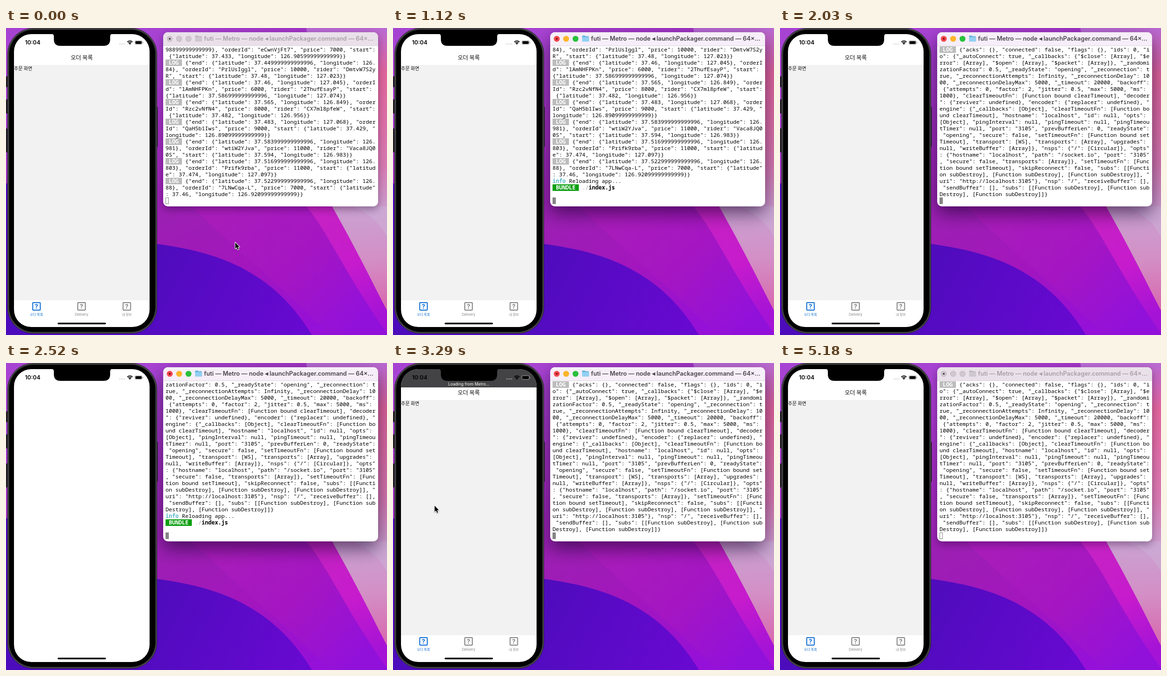
Animation, 812 px wide and 654 px high, one loop 5250 ms. Source, as an HTML page with a canvas:

```html
<!DOCTYPE html>
<html lang="ko">
<head>
<meta charset="utf-8">
<title>App reload</title>
<style>
html, body { margin: 0; width: 100%; height: 100%; overflow: hidden; }
canvas { display: block; }
</style>
</head>
<body>
<canvas id="stage" width="812" height="654"></canvas>
<script>
const ctx = document.getElementById('stage').getContext('2d');
const LOOP = 5250, STEP = 70, COLS = 64, ROWS = 23;
const SANS = 'Inter, "Noto Sans CJK KR", "Noto Sans CJK", sans-serif';
const HANGUL = '"Noto Sans CJK KR", "Noto Sans CJK", sans-serif';
const MONO = '11.667px "Noto Sans Mono", "DejaVu Sans Mono", monospace';

// Terminal contents
const wrap = s => s.match(new RegExp(`.{1,${COLS}}`, 'g'));
const log = s => wrap(' LOG  ' + s);
const place = (lat, lng) => `{"latitude": ${lat}, "longitude": ${lng}}`;
const order = (end, id, price, rider, start) => log(
  `{"end": ${place(...end)}, "orderId": "${id}", "price": ${price}, ` +
  (rider ? `"rider": "${rider}", ` : '') + `"start": ${place(...start)}}`);

const orders = [
  ...wrap('98899999999999}, "orderId": "eCwnVjFt7", "price": 7000, "start": ' + place(37.433, '126.90599999999999') + '}'),
  ...order(['37.449999999999996', 126.84], 'PrlUsIggl', 10000, 'DmtvW7S2yR', [37.48, 127.023]),
  ...order([37.46, 127.045], 'lAmNHFPKn', 6000, '2ThufEsayP', ['37.586999999999996', 127.074]),
  ...order([37.565, 126.849], 'Rzc2vNfN4', 8000, 'CX7ml8pfeW', [37.482, 126.956]),
  ...order([37.483, 127.068], 'QaH5b1Iws', 9000, '', [37.429, '126.89099999999999']),
  ...order(['37.583999999999996', 126.981], 'wtiW2YJva', 11000, 'Vaca8JQ00S', [37.594, 126.983]),
  ...order(['37.516999999999996', 126.803], 'Prifk9rba', 11000, '', [37.474, 127.097]),
  ...order(['37.522999999999996', 126.88], '7LNwCqa-L', 7000, '', [37.46, '126.92099999999999'])
];
const subs = '"subs": [[Function subDestroy], [Function subDestroy], [Function subDestroy]]';
const socket = log('{"acks": {}, "connected": false, "flags": {}, "ids": 0, "io": {"_autoConnect": true, ' +
  '"_callbacks": {"$close": [Array], "$error": [Array], "$open": [Array], "$packet": [Array]}, ' +
  '"_randomizationFactor": 0.5, "_readyState": "opening", "_reconnection": true, ' +
  '"_reconnectionAttempts": Infinity, "_reconnectionDelay": 1000, "_reconnectionDelayMax": 5000, ' +
  '"_timeout": 20000, "backoff": {"attempts": 0, "factor": 2, "jitter": 0.5, "max": 5000, "ms": 1000}, ' +
  '"clearTimeoutFn": [Function bound clearTimeout], "decoder": {"reviver": undefined}, ' +
  '"encoder": {"replacer": undefined}, "engine": {"_callbacks": [Object], ' +
  '"clearTimeoutFn": [Function bound clearTimeout], "hostname": "localhost", "id": null, "opts": [Object], ' +
  '"pingInterval": null, "pingTimeout": null, "pingTimeoutTimer": null, "port": "3105", ' +
  '"prevBufferLen": 0, "readyState": "opening", "secure": false, "setTimeoutFn": [Function bound setTimeout], ' +
  '"transport": [WS], "transports": [Array], "upgrades": null, "writeBuffer": [Array]}, ' +
  '"nsps": {"/": [Circular]}, "opts": {"hostname": "localhost", "path": "/socket.io", "port": "3105", ' +
  '"secure": false, "transports": [Array]}, "setTimeoutFn": [Function bound setTimeout], ' +
  `"skipReconnect": false, ${subs}, "uri": "http://localhost:3105"}, "nsp": "/", ` +
  `"receiveBuffer": [], "sendBuffer": [], ${subs}}`);
const bundling = ['info Reloading app...', ' BUNDLE  ./index.js', ''];

// Timeline
const reloads = [
  { start: 980, blank: 1190, ready: 1400, done: 1610 },
  { start: 2240, blank: 2450, ready: 2800, done: 3500 }
];
const FOCUS = 700, BLUR = 5110;
const trails = [
  [[0, 488, 456], [280, 488, 456], [700, 590, 330], [980, 590, 330]],
  [[2800, 250, 420], [3290, 88, 303], [3570, 92, 360], [3710, 92, 360],
   [4130, 156, 491], [4340, 160, 500], [4480, 172, 570], [4620, 172, 570], [4690, 180, 660]]
];

// Drawing helpers
function box(x, y, w, h, r, fill) {
  ctx.beginPath();
  ctx.roundRect(x, y, w, h, r);
  ctx.fillStyle = fill;
  ctx.fill();
}
function shape(d, fill) {
  ctx.fillStyle = fill;
  ctx.fill(new Path2D(d));
}
function dot(x, y, r, fill) {
  ctx.beginPath();
  ctx.arc(x, y, r, 0, 7);
  ctx.fillStyle = fill;
  ctx.fill();
}
function text(s, x, y, font, fill, align = 'left') {
  ctx.font = font;
  ctx.fillStyle = fill;
  ctx.textAlign = align;
  ctx.fillText(s, x, y);
}
function blend(x0, y0, x1, y1, ...colors) {
  const g = ctx.createLinearGradient(x0, y0, x1, y1);
  colors.forEach((c, i) => g.addColorStop(i / (colors.length - 1), c));
  return g;
}

function wallpaper() {
  box(0, 0, 812, 654, 0, blend(330, 0, 620, 654, '#a743d2', '#a02fc0', '#9b20b2', '#a316bd', '#9510d8'));
  shape('M395 380C500 480 600 560 690 654H812V380Z', blend(460, 400, 720, 654, '#a81cba', '#a516c2', '#9211da'));
  shape('M640 380C690 440 720 520 812 650V380Z', blend(680, 390, 790, 620, '#c522c4', '#c61bcd', '#a413d6'));
  shape('M640 0H812V602C780 540 750 478 695 380Z', blend(760, 0, 790, 590, '#b86ad4', '#e0659c', '#dd6fa6', '#d77bb2', '#cba0d0', '#d38fc6', '#d86bb0'));
  shape('M740 380C775 395 800 420 812 445V380Z', 'rgba(205,180,215,.45)');
  shape('M0 330C100 400 200 442 322 460C420 474 560 500 652 654H0Z', blend(300, 470, 620, 640, '#4d0cbb', '#5a0ac6', '#6709d0'));
}

function tab(x, label, color, font) {
  ctx.lineWidth = 2;
  ctx.strokeStyle = color;
  ctx.beginPath();
  ctx.roundRect(x - 8, 585, 16, 16, 1);
  ctx.stroke();
  text('?', x, 598, `700 13px ${SANS}`, color, 'center');
  text(label, x, 613, font, color, 'center');
}

function statusBar() {
  text('10:04', 40.5, 35.4, `600 12px ${SANS}`, '#000');
  for (let i = 0; i < 4; i++) dot(242.5 + 3.4 * i, 34, 1, '#c2c2c2');
  ctx.strokeStyle = '#000';
  ctx.lineWidth = 1.8;
  for (const r of [4.6, 7.6]) {
    ctx.beginPath();
    ctx.arc(264, 35, r, -Math.PI * .76, -Math.PI * .24);
    ctx.stroke();
  }
  shape('M264 35.5L261.8 33A3 3 0 0 1 266.2 33Z', '#000');
  ctx.lineWidth = .8;
  ctx.strokeStyle = '#999';
  ctx.beginPath();
  ctx.roundRect(274.5, 26.8, 16, 8.4, 2.4);
  ctx.stroke();
  box(275.8, 28, 13.4, 6, 1.4, '#000');
  box(291.3, 29.5, 1.2, 3, 1, '#999');
}

function phone(blank, banner) {
  for (const [y, h] of [[103, 23], [152, 30], [214, 51]]) box(0, y, 5, h, 1, '#27212b');
  box(319, 168, 4.5, 85, 1, '#27212b');
  box(3, 0, 319, 651, 56, '#1d1d1f');
  box(4, 1, 317, 649, 55, '#59595c');
  box(5.2, 2.2, 314.6, 646.6, 54, '#29292b');
  box(7, 4, 311, 643, 52, '#000');

  ctx.save();
  ctx.beginPath();
  ctx.roundRect(17, 13, 289, 624, 37);
  ctx.clip();
  box(17, 13, 289, 624, 0, '#fff');
  if (!blank) {
    box(17, 80, 289, 500, 0, '#f2f2f2');
    box(17, 79.5, 289, .6, 0, '#dcdcdc');
    text('오더 목록', 161.5, 68, `500 12px ${HANGUL}`, '#111', 'center');
    text('주문 화면', 17, 90, `10px ${HANGUL}`, '#111');
    tab(65, '오더 목록', '#1470d6', `7px ${HANGUL}`);
    tab(161, 'Delivery', '#858585', `7.4px ${SANS}`);
    tab(257.5, '내 정보', '#858585', `7px ${HANGUL}`);
  }
  if (banner) {
    box(17, 13, 289, 39, 0, '#434345');
    text('Loading from Metro...', 161.5, 48, `8.6px ${SANS}`, '#fff', 'center');
  }
  statusBar();
  box(110, 627.7, 103, 3.6, 1.8, '#000');
  ctx.restore();
  shape('M97 12Q102 13 102 18V24Q102 38 116 38H208Q222 38 222 24V18Q222 13 227 12Z', '#000');
}

function badge(s, y, color) {
  box(340, y, s.length * 7, 14, 0, color);
  text(s, 340, y + 11, `700 ${MONO}`, '#fff');
}

function line(s, y) {
  const put = (part, col, color = '#000', weight = 400) =>
    text(part, 340 + col * 7, y + 11, `${weight} ${MONO}`, color);
  if (s.startsWith(' LOG ')) {
    badge(' LOG ', y, '#bcbcbc');
    put(s.slice(6), 6);
  } else if (s.startsWith(' BUNDLE ')) {
    badge(' BUNDLE ', y, '#0b9f10');
    put('./', 9, '#999');
    put('index.js', 11, '#000', 700);
  } else if (s.startsWith('info')) {
    put('info', 0, '#55b5c8', 700);
    put(s.slice(5), 5);
  } else put(s, 0);
}

function terminal(lines, active) {
  ctx.save();
  ctx.shadowColor = active ? 'rgba(20,0,40,.6)' : 'rgba(20,0,40,.38)';
  ctx.shadowBlur = active ? 38 : 18;
  ctx.shadowOffsetY = active ? 15 : 6;
  box(335, 9, 458, 371, 10, '#fff');
  ctx.restore();
  box(335, 9, 458, 29, [10, 10, 0, 0], active ? '#f6eef8' : '#e9e0ea');
  box(335, 37.4, 458, .8, 0, '#d5ccd6');

  const lights = active ? ['#f2494f', '#fdb52b', '#28c03c'] : Array(3).fill('#cfc6d0');
  lights.forEach((c, i) => {
    dot(349 + 20 * i, 23, 6.3, active ? c : '#bdb4be');
    dot(349 + 20 * i, 23, 5.5, c);
  });
  dot(349, 23, 2.1, active ? '#7b0d12' : '#4c474d');

  const folder = active ? ['#69b5df', '#93d0f2'] : ['#c1b9c2', '#cfc8d0'];
  box(403, 16, 7, 5, 1.5, folder[0]);
  box(403, 17.5, 14.5, 11.5, 1.5, folder[0]);
  box(403, 19.5, 14.5, 9.5, 1.5, folder[1]);
  text('futi — Metro — node ◂ launchPackager.command — 64×…', 422, 27.4,
    `600 12.8px ${SANS}`, active ? '#49434b' : '#a79fa8');

  lines.slice(-ROWS).forEach((s, i) => line(s, 39 + 14 * i));
  if (active) box(340, 361, 7, 14, 0, '#858585');
  else {
    ctx.strokeStyle = '#858585';
    ctx.lineWidth = 1;
    ctx.strokeRect(340.5, 361.5, 6, 13);
  }
}

function pointer(t) {
  const trail = trails.find(p => t >= p[0][0] && t < p.at(-1)[0]);
  if (!trail) return;
  const i = trail.findIndex(p => p[0] > t);
  const [t0, x0, y0] = trail[i - 1], [t1, x1, y1] = trail[i];
  const u = (t - t0) / (t1 - t0), k = u * u * (3 - 2 * u);
  ctx.save();
  ctx.translate(x0 + (x1 - x0) * k, y0 + (y1 - y0) * k);
  const arrow = new Path2D('M.7 1V14L3.7 11.3L5.9 16.2L8 15.3L5.8 10.5H9.8Z');
  ctx.shadowColor = 'rgba(0,0,0,.35)';
  ctx.shadowBlur = 2;
  ctx.shadowOffsetY = 1;
  ctx.lineWidth = 2.2;
  ctx.lineJoin = 'round';
  ctx.strokeStyle = '#fff';
  ctx.stroke(arrow);
  ctx.shadowColor = 'transparent';
  ctx.fillStyle = '#000';
  ctx.fill(arrow);
  ctx.restore();
}

function draw() {
  const t = Math.floor(performance.now() % LOOP / STEP) * STEP;
  let lines = orders, blank = false, banner = false;
  for (const r of reloads) {
    if (t >= r.start) lines = t < r.ready ? [...lines, ...bundling] : socket;
    blank ||= t >= r.blank && t < r.ready;
    banner ||= t >= r.ready && t < r.done;
  }
  wallpaper();
  terminal(lines, t >= FOCUS && t < BLUR);
  phone(blank, banner);
  pointer(t);
  requestAnimationFrame(draw);
}
draw();
</script>
</body>
</html>
```
